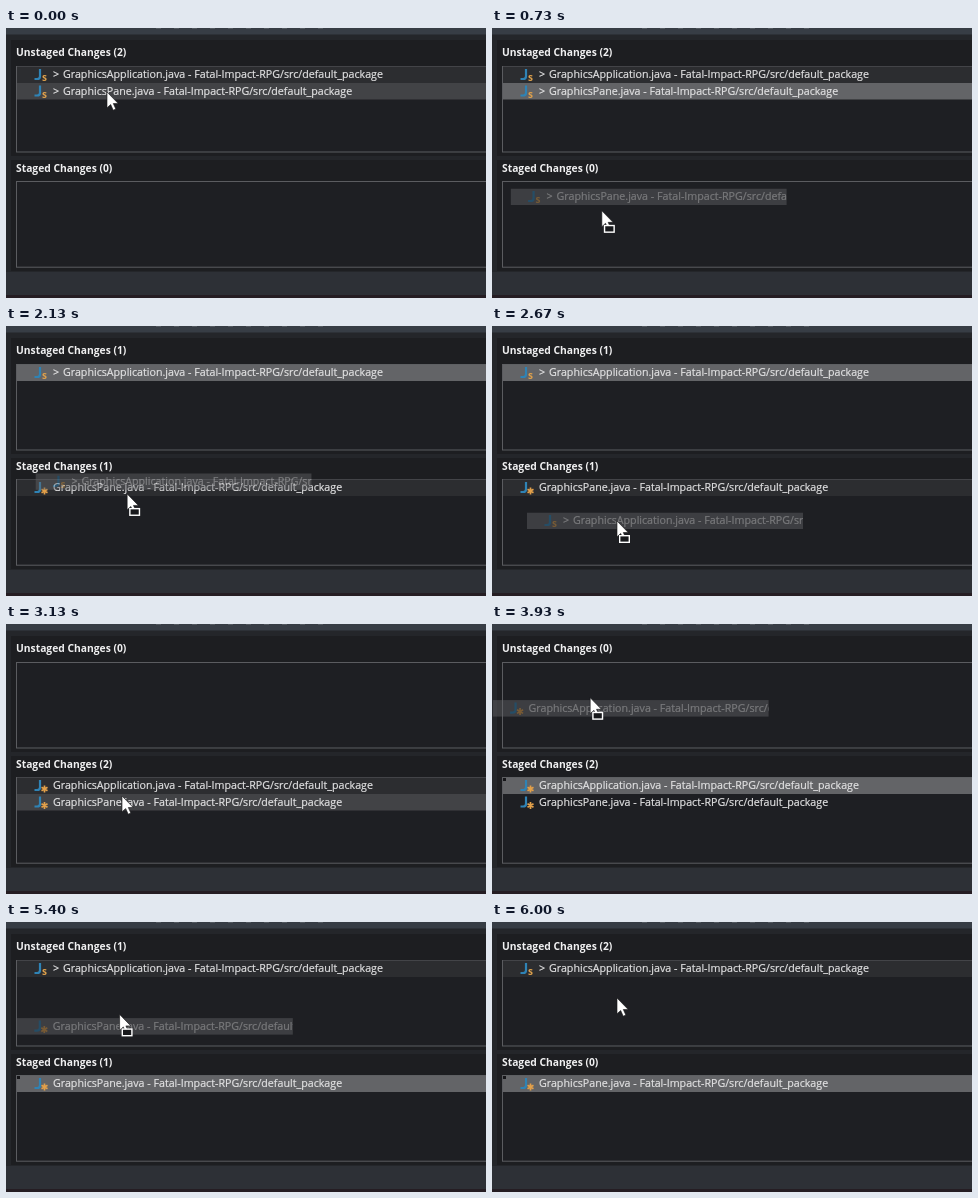
These frames come from a looping animation (480 by 270 pixels, 6.07 s). An HTML page:

```html
<!DOCTYPE html>
<html lang="en">
<head>
<meta charset="utf-8">
<title>Staging files</title>
<style>
html, body { margin: 0; width: 100%; height: 100%; overflow: hidden; background: #1f2023; }
svg { display: block; width: 480px; height: 270px; }
text { font-family: "Open Sans", "Noto Sans", sans-serif; font-size: 10.68px; fill: #e2e2e3; stroke: #e2e2e3; stroke-width: .2; white-space: pre; }
.head { font-size: 10.3px; font-weight: 700; fill: #f0f0f1; stroke: none; }
.mod { font-size: 10px; font-weight: 700; fill: #dda04c; stroke: none; }
</style>
</head>
<body>
<svg viewBox="0 0 480 270">
  <defs>
    <clipPath id="ghostClip"><rect x="11" y="0" width="276" height="17"/></clipPath>
  </defs>
  <rect width="480" height="270" fill="#24262a"/>
  <rect width="480" height="6.5" fill="#373d45"/>
  <path d="M150 .5H330" stroke="#6d737a" stroke-dasharray="5 13" opacity=".5"/>
  <rect x="5" y="12" width="475" height="116" fill="#1d1e21"/>
  <rect x="5" y="132" width="475" height="111" fill="#1d1e21"/>
  <rect y="244" width="480" height="23" fill="#2d3036"/>
  <rect y="267" width="480" height="3" fill="#251d23"/>
  <g fill="#1e1f23" stroke="#5b5c60">
    <rect x="10.5" y="38.5" width="480" height="85.5"/>
    <rect x="10.5" y="153.5" width="480" height="85.7"/>
  </g>
  <text class="head" id="unstaged" x="10" y="28.2"></text>
  <text class="head" id="staged" x="10" y="143.5"></text>
  <g id="rows"></g>
  <g id="ghost" opacity=".46"><g id="ghostRow" clip-path="url(#ghostClip)"></g></g>
  <g id="cursor">
    <path d="M0 0V15.8L3.7 12.5L6.2 18.2L8.8 17L6.3 11.5H11.2Z" fill="#fff" stroke="#18181a" stroke-width=".6"/>
    <rect id="badge" x="2.7" y="14.7" width="9.6" height="6.6" fill="#18191c" stroke="#fff" stroke-width="1.4"/>
  </g>
</svg>
<script>
const LOOP = 6070, STEP = 1000 / 15, LAG = 40, ROW = 16.5;
const TOP = { unstaged: 38.5, staged: 153.5 };
const FILES = { A: "GraphicsApplication", P: "GraphicsPane" };
const FILL = { selected: "#636467", hover: "#424346", dim: "#2c2d30", plain: "none" };
const $ = id => document.getElementById(id);

// The pointer rests between moves; each eases out to its end point.
const HOME = [101, 64];
const MOVES = [
  { from: 300, to: 800, end: [110, 185] },
  { from: 1260, to: 1670, end: [104, 47] },
  { from: 1870, to: 2330, end: [125, 195] },
  { from: 2670, to: 3130, end: [116, 172] },
  { from: 3330, to: 3500, end: [109, 161] },
  { from: 3530, to: 4000, end: [98, 72] },
  { from: 4000, to: 4300, end: [121, 95] },
  { from: 4450, to: 4930, end: [116, 157] },
  { from: 5070, to: 5670, end: [113, 76] },
  { from: 5800, to: 6000, end: [125, 76] }
];

const DRAGS = [
  { from: 330, to: 930, file: "P", list: "unstaged", index: 1, grab: [102, 74] },
  { from: 1900, to: 2800, file: "A", list: "unstaged", index: 0, grab: [101, 47] },
  { from: 3550, to: 4190, file: "A", list: "staged", index: 0, grab: [109, 154] },
  { from: 5100, to: 5860, file: "P", list: "staged", index: 0, grab: [114, 155] }
];

// Each row is a file letter and its highlight.
const STATES = [
  { from: 0, count: [2, 0], unstaged: "A dim,P hover", staged: "" },
  { from: 260, count: [2, 0], unstaged: "A dim,P selected", staged: "" },
  { from: 990, count: [1, 1], unstaged: "A dim", staged: "P hover" },
  { from: 1390, count: [1, 1], unstaged: "A dim", staged: "P dim" },
  { from: 1860, count: [1, 1], unstaged: "A selected", staged: "P dim" },
  { from: 2860, count: [0, 2], unstaged: "", staged: "A dim,P hover" },
  { from: 3460, count: [0, 2], unstaged: "", staged: "A selected,P plain" },
  { from: 4260, count: [1, 1], unstaged: "A dim", staged: "P selected" },
  { from: 5860, count: [2, 0], unstaged: "A dim", staged: "P selected" }
];

function pointer(t) {
  let pos = HOME;
  for (const { from, to, end } of MOVES) {
    if (t <= from) break;
    const left = 1 - Math.min(1, (t - from) / (to - from));
    pos = pos.map((p, k) => end[k] + (p - end[k]) * left * left);
  }
  return pos;
}

function row(file, list, y, style) {
  const staged = list === "staged";
  const name = FILES[file] + ".java - Fatal-Impact-RPG/src/default_package";
  const mark = staged
    ? '<path d="M38.5 8v7M35.5 9.7l6 3.6M35.5 13.3l6-3.6" stroke="#e2a04a" stroke-width="1.7"/>'
    : '<text class="mod" x="36" y="14.7">s</text><text x="47" y="11.5">&gt;</text>';
  return `<g transform="translate(0 ${y})">
    <rect x="11" width="469" height="${ROW}" fill="${FILL[style]}"/>
    <path d="M34 2.5v7.2q0 2.8-2.9 2.8h-2.6" fill="none" stroke="#2f83b5" stroke-width="2.2"/>
    ${mark}
    <text x="${staged ? 47 : 57}" y="11.5">${name}</text></g>`;
}

function rows(state, list) {
  return state[list].split(",").filter(Boolean).map((item, i) => {
    const [file, style] = item.split(" ");
    return row(file, list, TOP[list] + i * ROW, style);
  }).join("");
}

let shownState, shownDrag;

function draw(ms) {
  const t = Math.floor((ms % LOOP + 4) / STEP) * STEP;
  const state = STATES.filter(s => s.from <= t).pop();
  if (state !== shownState) {
    shownState = state;
    $("unstaged").textContent = `Unstaged Changes (${state.count[0]})`;
    $("staged").textContent = `Staged Changes (${state.count[1]})`;
    const focus = state.staged.includes("selected")
      ? '<rect x="11" y="154" width="3" height="3" fill="#151518"/>' : "";
    $("rows").innerHTML = rows(state, "unstaged") + rows(state, "staged") + focus;
  }
  $("cursor").setAttribute("transform", `translate(${pointer(t)})`);

  const drag = DRAGS.find(d => t >= d.from && t < d.to);
  $("badge").style.display = $("ghost").style.display = drag ? "" : "none";
  if (!drag) return;
  if (drag !== shownDrag) {
    shownDrag = drag;
    $("ghostRow").innerHTML = row(drag.file, drag.list, 0, "selected");
  }
  const [x, y] = pointer(t - LAG);
  const top = TOP[drag.list] + drag.index * ROW;
  $("ghost").setAttribute("transform", `translate(${x - drag.grab[0]} ${y - drag.grab[1] + top})`);
}

function tick() {
  draw(performance.now());
  requestAnimationFrame(tick);
}
tick();
</script>
</body>
</html>
```
